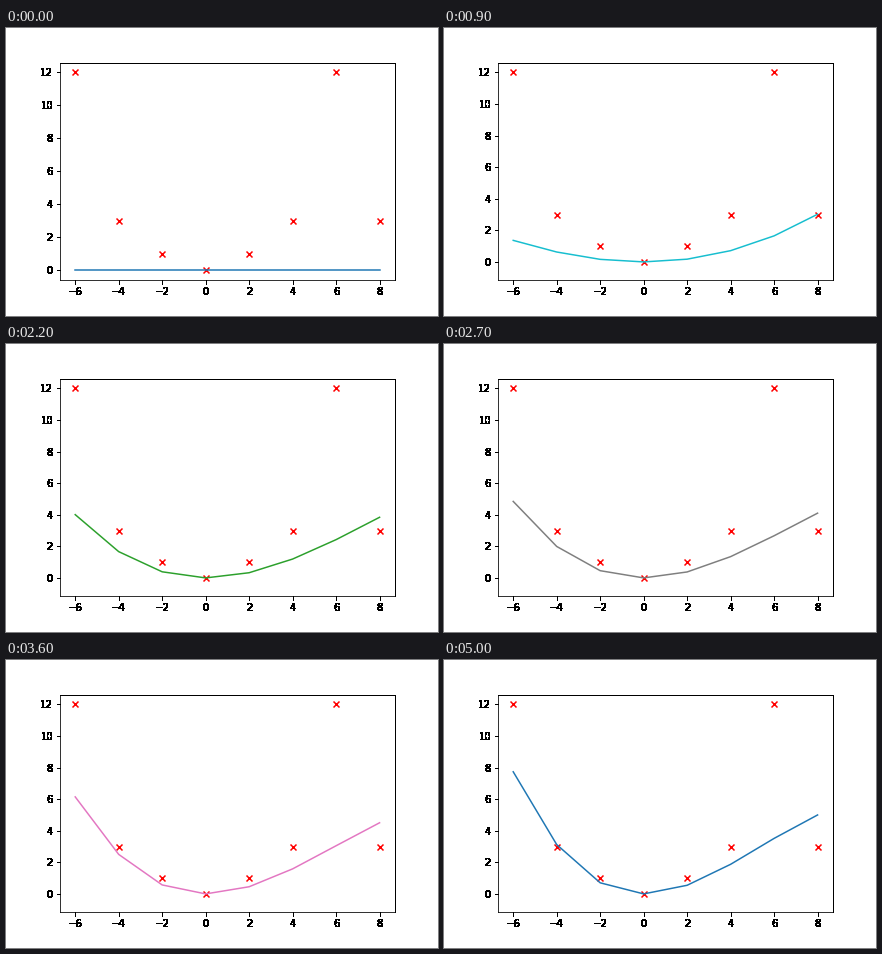
Write a matplotlib script that moves like this. It is 432x288 px and loops after 5100 ms.

```python
import numpy as np
import matplotlib.pyplot as plt
from matplotlib.animation import FuncAnimation

FRAMES = 51
STEPS = 50      # descent steps per frame
RATE = 1e-7
MARGIN = 0.05

x = np.arange(-6, 9, 2)
y = np.array([12, 3, 1, 0, 1, 3, 12, 3])


def fit_curves():
    """Fit a*x^2 + b*x^3 by gradient descent, one curve per frame."""
    basis = np.stack([x**2, x**3], axis=1).astype(float)
    weights = np.zeros(2)
    curves = []
    for _ in range(FRAMES):
        curves.append(basis @ weights)
        for _ in range(STEPS):
            weights = weights + RATE * basis.T @ (y - basis @ weights)
    return np.array(curves)


def harden(img, dpi):
    """Turn every touched pixel solid black."""
    out = np.zeros_like(img)
    out[..., 3] = img[..., 3] > 0
    return out, 0, 0


curves = fit_curves()
# The view only ever grows to hold the lowest value so far.
lows = np.minimum.accumulate(curves.min(axis=1))

fig = plt.figure(figsize=(6, 4), dpi=72, facecolor="white")
fig.subplots_adjust(left=0.125, right=0.9, bottom=0.125, top=0.88)
ax = fig.add_subplot()
ax.scatter(x, y, color="red", marker="x")
line, = ax.plot(x, curves[0])

pad = MARGIN * np.ptp(x)
ax.set_xlim(x.min() - pad, x.max() + pad)
for part in (ax.xaxis, ax.yaxis, ax.spines["top"], ax.spines["right"]):
    part.set_agg_filter(harden)


def update(i):
    line.set_ydata(curves[i])
    line.set_color(f"C{i % 10}")
    low, high = min(lows[i], 0), y.max()
    pad = MARGIN * (high - low)
    ax.set_ylim(low - pad, high + pad)
    return line,


anim = FuncAnimation(fig, update, frames=FRAMES, interval=100,
                     init_func=lambda: update(0), repeat=True, repeat_delay=0)
plt.show()
```
